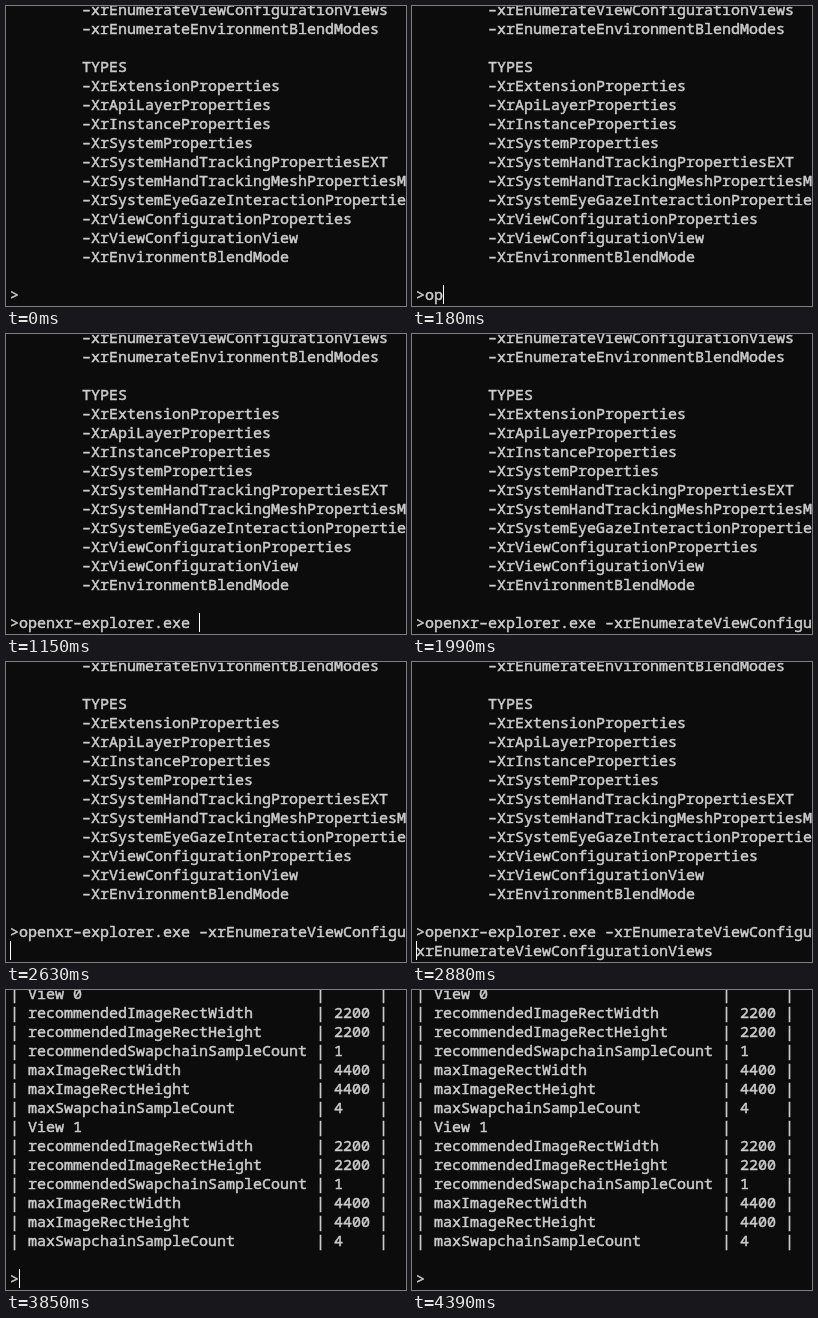
Animation of 400 by 300 pixels, one loop 4950 ms. Source, as an HTML page:

```html
<!DOCTYPE html>
<html lang="en">
<head>
<meta charset="utf-8">
<title>Terminal session</title>
<style>
html, body { margin: 0; width: 100%; height: 100%; overflow: hidden; background: #0c0c0c; }
pre {
  position: absolute; inset: -6px 0 0 4px; margin: 0; overflow: hidden; color: #ccc;
  font: 15px/19px "Noto Sans Mono", "DejaVu Sans Mono", monospace;
  font-variant-ligatures: none;
  -webkit-text-stroke: .5px #ccc;
}
#cursor { position: absolute; width: 1px; height: 19px; top: 279px; background: #fff; }
</style>
</head>
<body>
<pre id="screen"></pre>
<div id="cursor"></div>
<script>
const LOOP = 4950, CELL = 9;
const screen = document.getElementById('screen');
const cursor = document.getElementById('cursor');

const indent = ' '.repeat(8);
const item = name => indent + '-' + name;
const help = [
  ...['xrEnumerateViewConfigurationViews', 'xrEnumerateEnvironmentBlendModes'].map(item),
  '',
  indent + 'TYPES',
  ...['XrExtensionProperties', 'XrApiLayerProperties', 'XrInstanceProperties',
    'XrSystemProperties', 'XrSystemHandTrackingPropertiesEXT',
    'XrSystemHandTrackingMeshPropertiesMSFT', 'XrSystemEyeGazeInteractionPropertiesEXT',
    'XrViewConfigurationProperties', 'XrViewConfigurationView',
    'XrEnvironmentBlendMode'].map(item),
  ''
];

const row = (name, value = '') => `| ${name.padEnd(32)}| ${String(value).padEnd(4)} |`;
const view = n => [
  row('View ' + n),
  row('recommendedImageRectWidth', 2200),
  row('recommendedImageRectHeight', 2200),
  row('recommendedSwapchainSampleCount', 1),
  row('maxImageRectWidth', 4400),
  row('maxImageRectHeight', 4400),
  row('maxSwapchainSampleCount', 4)
];
const table = [...view(0), ...view(1), '', '>'];

const func = 'xrEnumerateViewConfigurationViews';
const command = '>openxr-explorer.exe -' + func;
const typed = n => [...help, command.slice(0, n)];
const sent = last => [...help.slice(1), command, last];

// [start ms, lines, cursor column or -1 when hidden]
const steps = [
  [0, typed(1), -1],
  [100, typed(2), 2],
  [180, typed(3), 3],
  [410, typed(20), 20],
  [1070, typed(20), -1],
  [1150, typed(21), 21],
  [1530, typed(22), 22],
  [1990, typed(), -1],
  [2630, sent(''), 0],
  [2880, sent(func), 0],
  [2930, table, 1],
  [3290, table, -1],
  [3850, table, 1],
  [4390, table, -1]
];

let shown;
function draw(now) {
  const t = now % LOOP;
  const step = steps.findLast(s => s[0] <= t);
  if (step !== shown) {
    shown = step;
    const [, lines, col] = step;
    // the terminal shows wide hyphens
    screen.textContent = lines.join('\n').replace(/-/g, '–');
    cursor.style.left = 4 + col * CELL + 'px';
    cursor.hidden = col < 0;
  }
  requestAnimationFrame(() => draw(performance.now() - start));
}
const start = performance.now();
draw(0);
</script>
</body>
</html>
```
